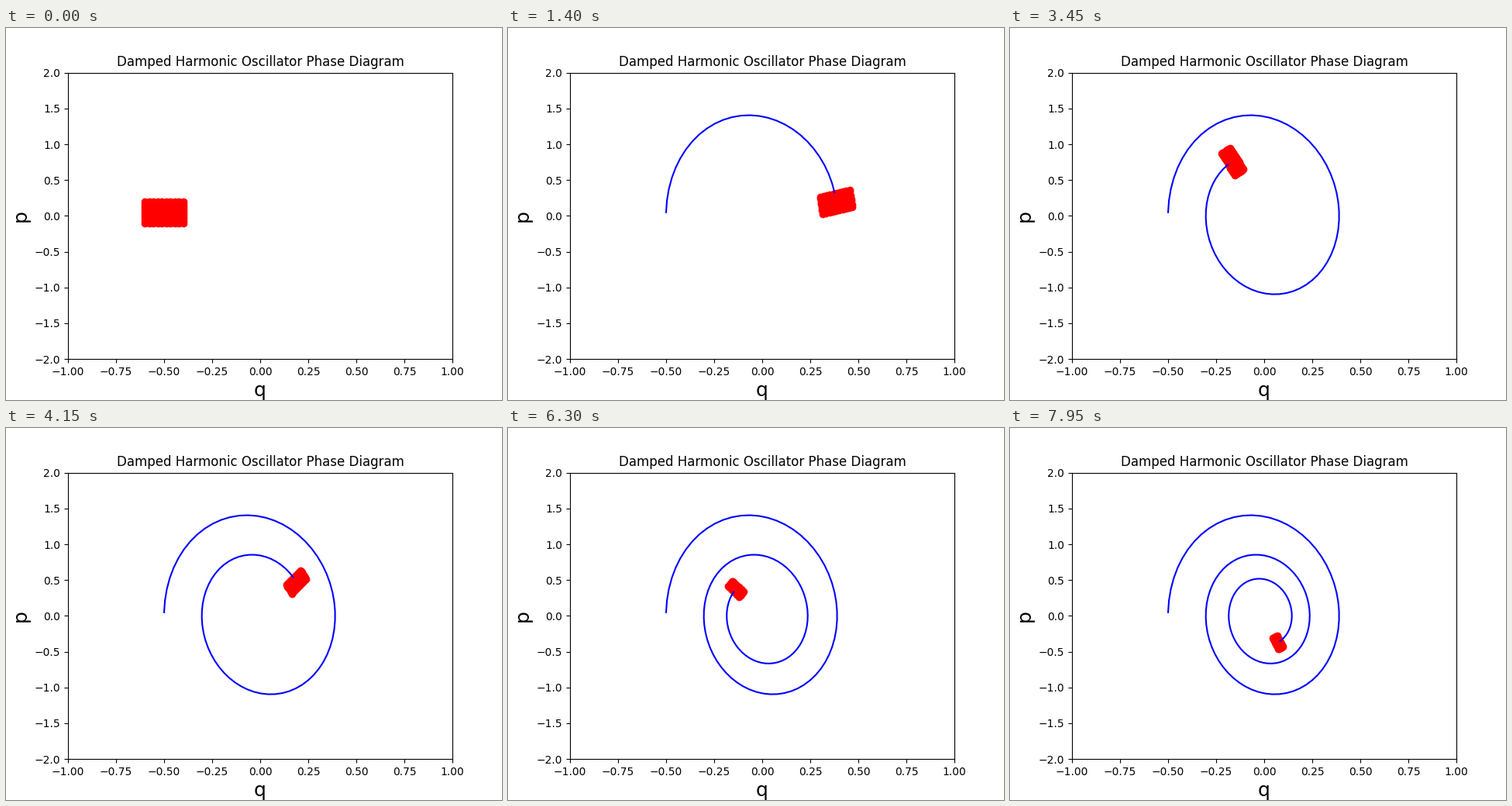
Write a matplotlib script that moves like this. It is 640 px wide and 480 px high and loops after 8000 ms.

```python
import numpy as np
import matplotlib.pyplot as plt
from matplotlib.animation import FuncAnimation

K = 10.0       # spring constant, unit mass
BETA = 0.25    # half the damping coefficient
W = np.sqrt(K - BETA ** 2)
FRAMES = 160
TIMES = np.linspace(0, 10, 300)


def state(t, q0, p0):
    """Exact damped oscillator solution for position and momentum."""
    decay, c, s = np.exp(-BETA * t), np.cos(W * t), np.sin(W * t)
    q = decay * (q0 * c + (p0 + BETA * q0) / W * s)
    p = decay * (p0 * c - (K * q0 + BETA * p0) / W * s)
    return q, p


grid_q, grid_p = np.meshgrid(np.linspace(-0.6, -0.4, 10),
                             np.linspace(-0.1, 0.2, 10))
grid_q, grid_p = grid_q.ravel(), grid_p.ravel()
path_q, path_p = state(TIMES, -0.5, 0.05)

fig, ax = plt.subplots(figsize=(6.4, 4.8), dpi=100)
ax.set_xlim(-1, 1)
ax.set_ylim(-2, 2)
ax.set_title("Damped Harmonic Oscillator Phase Diagram")
ax.set_xlabel("q", fontsize=18)
ax.set_ylabel("p", fontsize=18)
cloud, = ax.plot([], [], "ro")
trail, = ax.plot([], [], "b-", lw=1.5)


def update(i):
    cloud.set_data(*state(TIMES[i], grid_q, grid_p))
    trail.set_data(path_q[:i], path_p[:i])
    return cloud, trail


anim = FuncAnimation(fig, update, frames=FRAMES, interval=50,
                     repeat=True, repeat_delay=0)
plt.show()
```
